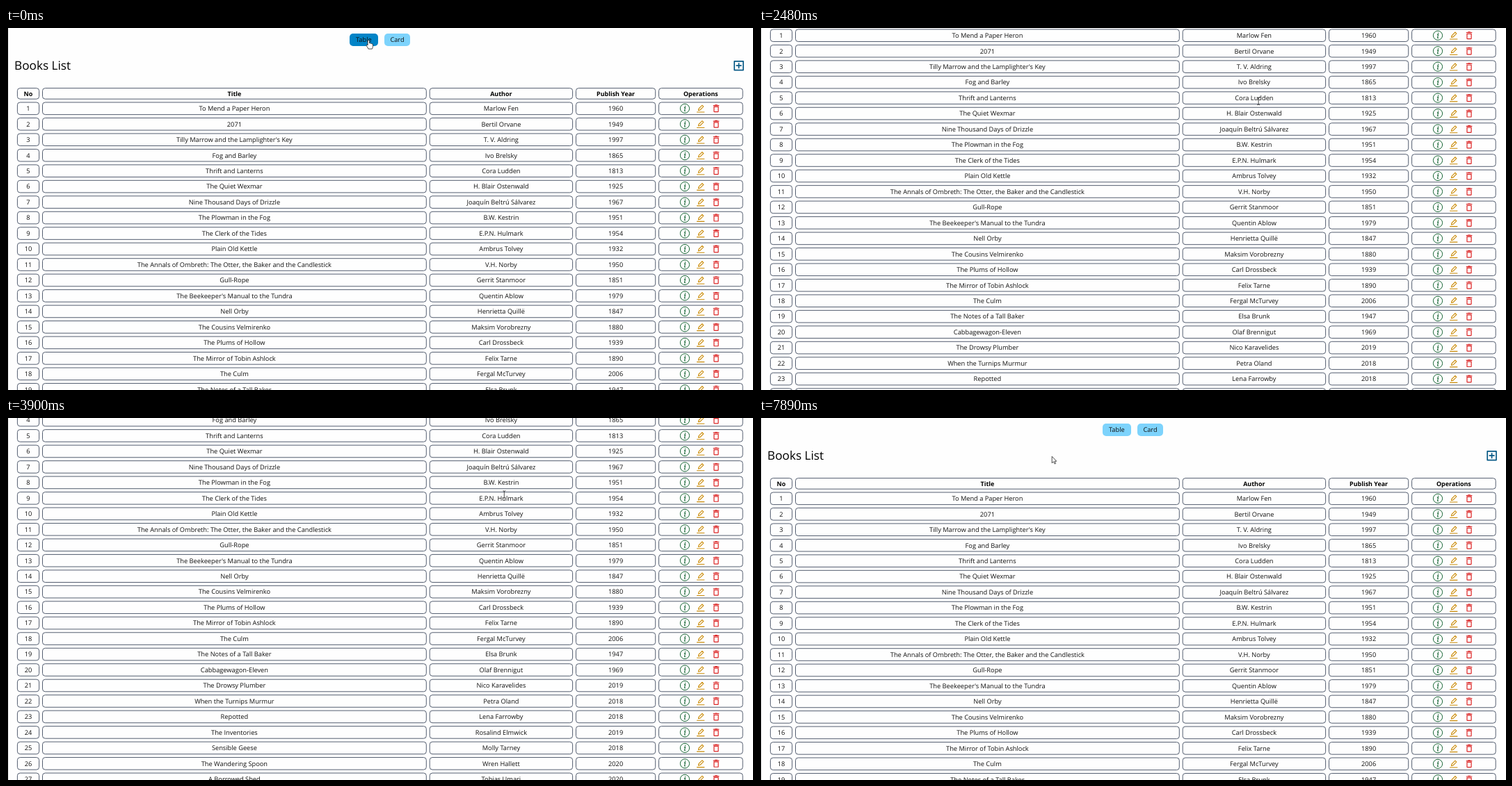
These frames come from a looping animation (1074x521 px, 8 s). An HTML page:

```html
<!DOCTYPE html>
<html lang="en">
<head>
<meta charset="utf-8">
<title>Books List</title>
<style>
  html, body { margin: 0; width: 100%; height: 100%; overflow: hidden; background: #fefefe; }
  svg { display: block; }
  text { font: 9.25px "Open Sans", "Noto Sans", sans-serif; fill: #111; text-rendering: geometricPrecision; }
  .mid { text-anchor: middle; }
  .head { font-size: 8.95px; font-weight: 700; fill: #000; }
  .title { font-size: 17.2px; fill: #000; }
  .label { font-size: 11.5px; fill: #6b7280; }
  .cell { fill: none; stroke: #4b5669; stroke-width: .95; }
  .btn { fill: #7dd3fc; }
  .hover { fill: #0284c7; }
  .back { fill: #075985; }
  #cursor path { fill: #fff; stroke: #222; stroke-width: .8; stroke-linejoin: round; }
  #cursor #beam { fill: none; }
</style>
</head>
<body>
<svg width="1074" height="521" viewBox="0 0 1074 521">
  <defs>
    <g id="ops" fill="none">
      <g stroke="#166534">
        <circle cx="976" r="6.6" stroke-width="1"/>
        <path d="M974.9-1.2 976.6-1.5 975.6 3.2Q975.6 3.9 976.9 3.4" stroke-width="1.1"/>
        <circle cx="976.6" cy="-3.4" r=".4"/>
      </g>
      <g transform="translate(991.4 -7.3) scale(.61)" stroke="#ca8a04" stroke-width="1.8">
        <path d="M6.8 16.3 7.6 12.4 15.6 4.4 18.7 7.5 10.7 15.5ZM2.8 20.6H21.2"/>
      </g>
      <g transform="translate(1013.7 -7.3) scale(.61)" stroke="#dc2626" stroke-width="2">
        <path d="M7 8V19q0 1 1 1h8q1 0 1-1V8ZM5 5H19M9 4h6"/>
      </g>
    </g>
  </defs>

  <g id="list">
    <rect class="btn" id="tableBtn" x="494" y="8" width="41" height="18" rx="5"/>
    <rect class="btn" id="cardBtn" x="544" y="8" width="37" height="18" rx="5"/>
    <text class="mid" x="514.3" y="20">Table</text>
    <text class="mid" x="562.5" y="20">Card</text>
    <text class="title" x="12" y="60">Books List</text>
    <path d="M1047.2 47.8h12.8v12.8h-12.8ZM1049.6 54.2h8M1053.6 50.2v8" fill="none" stroke="#075985" stroke-width="1.7" stroke-linejoin="round"/>
  </g>

  <g id="book">
    <rect class="back" id="backBtn" x="12" y="8" width="31.3" height="18" rx="5"/>
    <path d="M33.5 17H21.7M25.5 13.2 21.7 17 25.5 20.8" fill="none" stroke="#fff"/>
    <text class="title" x="12" y="51">Show Book</text>
    <rect x="12.4" y="65" width="386" height="221.2" rx="7" fill="none" stroke="#38bdf8" stroke-width="1.3"/>
  </g>

  <rect width="3" height="521"/>

  <g id="cursor">
    <path id="arrow" d="M.4.3V9.8L2.7 7.8 4.3 11.1 5.8 10.4 4.2 7.2H7Z"/>
    <path id="hand" d="M-1.2 1.1Q0-.6 1.2 1.1V4.6Q2.4 3.9 3.1 5Q4.4 4.5 4.9 5.6Q6.2 5.3 6.2 6.8V9Q6 11 5.1 12.8H-.3Q-1.3 10.6-2.8 8.6Q-3.7 7-2.5 6.7Q-1.8 6.6-1.2 7.6Z"/>
    <path id="beam" d="M-2-5.3Q0-5.3 0-4.3Q0-5.3 2-5.3M0-4.3V4.3M-2 5.3Q0 5.3 0 4.3Q0 5.3 2 5.3"/>
  </g>
</svg>

<script>
const $ = id => document.getElementById(id);

const BOOKS = `To Mend a Paper Heron|Marlow Fen|1960
2071|Bertil Orvane|1949
Tilly Marrow and the Lamplighter's Key|T. V. Aldring|1997
Fog and Barley|Ivo Brelsky|1865
Thrift and Lanterns|Cora Ludden|1813
The Quiet Wexmar|H. Blair Ostenwald|1925
Nine Thousand Days of Drizzle|Joaquín Beltrú Sálvarez|1967
The Plowman in the Fog|B.W. Kestrin|1951
The Clerk of the Tides|E.P.N. Hulmark|1954
Plain Old Kettle|Ambrus Tolvey|1932
The Annals of Ombreth: The Otter, the Baker and the Candlestick|V.H. Norby|1950
Gull-Rope|Gerrit Stanmoor|1851
The Beekeeper's Manual to the Tundra|Quentin Ablow|1979
Nell Orby|Henrietta Quillë|1847
The Cousins Velmirenko|Maksim Vorobrezny|1880
The Plums of Hollow|Carl Drossbeck|1939
The Mirror of Tobin Ashlock|Felix Tarne|1890
The Culm|Fergal McTurvey|2006
The Notes of a Tall Baker|Elsa Brunk|1947
Cabbagewagon-Eleven|Olaf Brennigut|1969
The Drowsy Plumber|Nico Karavelides|2019
When the Turnips Murmur|Petra Oland|2018
Repotted|Lena Farrowby|2018
The Inventories|Rosalind Elmwick|2019
Sensible Geese|Molly Tarney|2018
The Wandering Spoon|Wren Hallett|2020
A Borrowed Shed|Tobias Umari|2020`.split('\n').map(line => line.split('|'));

// Rows further down the page
const pick = (words, i) => words.split(' ')[i % words.split(' ').length];
for (let i = 0; i < 9; i++)
  BOOKS.push([
    `The ${pick('Crooked Woollen Patient Lopsided', i)} ${pick('Teapot Orchard Ferryman', i)}`,
    `${pick('Ilse Bram Odette', i)} ${pick('Varnley Moskin Tullock Ferraby', i)}`,
    2021 - i % 5
  ]);

function add(parent, tag, attrs, content = '') {
  const node = document.createElementNS('http://www.w3.org/2000/svg', tag);
  for (const key in attrs) node.setAttribute(key, attrs[key]);
  node.textContent = content;
  parent.append(node);
  return node;
}

const WIDTHS = [31.2, 551.8, 205.4, 114.2, 120.6], GAP = 4.9;

function addRow(texts, y, height, cls) {
  let x = 16.4;
  WIDTHS.forEach((width, i) => {
    add($('list'), 'rect', { class: 'cell', x, y: y - height / 2, width, height, rx: 3.8 });
    if (texts[i]) add($('list'), 'text', { class: cls, x: x + width / 2, y: y + 3.3 }, texts[i]);
    x += width + GAP;
  });
}

addRow(['No', 'Title', 'Author', 'Publish Year', 'Operations'], 94.4, 15.6, 'mid head');
BOOKS.forEach((book, i) => {
  const y = 115.8 + i * 22.47;
  addRow([i + 1, ...book], y, 17.6, 'mid');
  add($('list'), 'use', { href: '#ops', y });
});

const [title, author, year] = BOOKS[0];
Object.entries({
  'Id': '656ed474db97416b5c1c2a7a',
  'Title': title,
  'Author': author,
  'Publish Year': year,
  'Create Time': 'Mon Dec 04 2023 23:42:44 GMT-0800 (Pacific Standard Time)',
  'Last Update Time': 'Wed Dec 06 2023 20:03:35 GMT-0800 (Pacific Standard Time)'
}).forEach(([label, value], i) => {
  const line = add($('book'), 'text', { x: 22, y: 95 + i * 33.75 });
  add(line, 'tspan', { class: 'label' }, label);
  add(line, 'tspan', { dx: 9 }, value);
});

// The screen refreshes every STEP ms, only while something moves
const STEP = 137;

// Pointer moves: start, end, and where it comes to rest
const MOVES = [
  [0, 0, 521.3, 17.3],
  [290, 1250, 1003, 79],
  [1370, 2330, 720.3, 100],
  [2480, 3110, 716.3, 110],
  [3640, 4050, 716.3, 110],
  [4450, 5410, 979.5, 116],
  [5690, 5960, 979, 128],
  [6390, 6801, 42.4, 31],
  [6938, 7350, 24, 17],
  [7500, 7890, 420.8, 55]
];

const progress = (t, start, end) => Math.min(1, Math.max(0, (t - start) / (end - start)));
const smooth = p => p * p * (3 - 2 * p);
const easeOut = p => 1 - (1 - p) ** 4;

// Wheel down smoothly, then back up with growing speed
const scrollAt = t => 321.5 * (smooth(progress(t, 2090, 3110)) - progress(t, 3640, 4050) ** 2.04);

function over(id, x, y) {
  const box = $(id).getBBox();
  return x > box.x && x < box.x + box.width && y > box.y && y < box.y + box.height;
}

function cursorShape(x, y, onBook) {
  if (onBook) return over('backBtn', x, y) ? 'hand' : 'arrow';
  const onIcon = y > 107 && Math.abs(x - 998) < 29;
  if (onIcon || over('tableBtn', x, y) || over('cardBtn', x, y)) return 'hand';
  return y > 86 && Math.abs(x - 712) < 35 ? 'beam' : 'arrow';
}

function draw() {
  const t = performance.now() % 8000;
  const i = MOVES.findLastIndex(move => move[0] <= t);
  const [start, end, toX, toY] = MOVES[i];
  const [, , fromX, fromY] = MOVES[Math.max(0, i - 1)];
  const now = t >= end ? end : start + STEP * Math.floor((t - start) / STEP + .15);

  const p = easeOut(progress(now, start - STEP, end));
  const x = fromX + (toX - fromX) * p, y = fromY + (toY - fromY) * p;
  const onBook = now >= 5690 && now < 7500;

  $('list').style.display = onBook ? 'none' : '';
  $('book').style.display = onBook ? '' : 'none';
  $('list').setAttribute('transform', `translate(0 ${-scrollAt(now)})`);
  $('tableBtn').classList.toggle('hover', !onBook && over('tableBtn', x, y));
  $('cursor').setAttribute('transform', `translate(${x} ${y})`);
  const shape = cursorShape(x, y, onBook);
  for (const id of ['arrow', 'hand', 'beam']) $(id).style.display = id === shape ? '' : 'none';
  requestAnimationFrame(draw);
}
draw();
</script>
</body>
</html>
```
